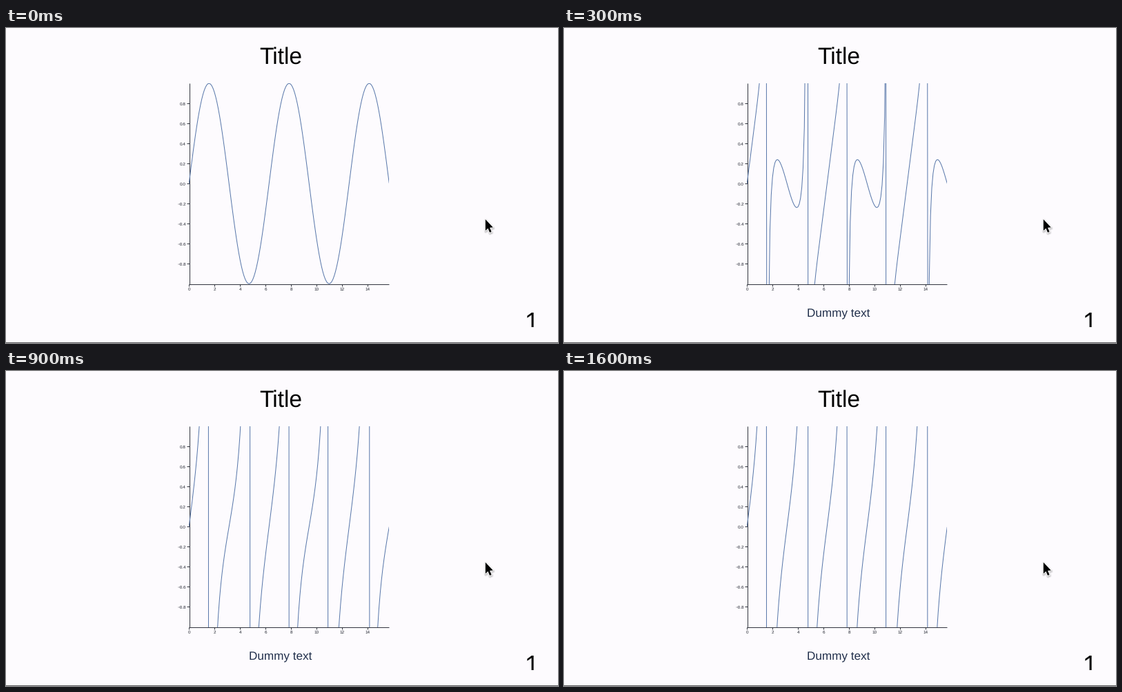
Animation of 800 by 456 pixels, one loop 1.65 s. Source, as a matplotlib script:

```python
import numpy as np
import matplotlib.pyplot as plt
from matplotlib.animation import FuncAnimation
from matplotlib.patches import Polygon, Rectangle

W, H, DPI = 800, 456, 64
FRAMES, STEP = 33, 50            # one loop lasts 1650 ms
MORPH_START, MORPH_TIME = 26, 1000

PX = 72 / DPI                    # points per pixel
LEFT, MIDDLE, SIZE = 265.2, 225.2, 290
X_MAX = 15.7
BACK, AXIS, CURVE = "#fdfbfe", "#33363f", "#5877aa"

plt.rcParams.update({
    "font.family": "Liberation Sans",
    "text.hinting": "none",
    "path.simplify": False,
})

fig = plt.figure(figsize=(W / DPI, H / DPI), dpi=DPI, facecolor=BACK)
ax = fig.add_axes([0, 0, 1, 1])
ax.set_xlim(0, W)
ax.set_ylim(H, 0)
ax.axis("off")


def to_x(x):
    return LEFT + x * SIZE / X_MAX


def to_y(y):
    return MIDDLE - y * SIZE / 2


def label(x, y, text, size, color="black", ha="center"):
    return ax.text(x, y, text, fontsize=size * PX, color=color,
                   ha=ha, va="baseline")


def line(xs, ys, color=AXIS, width=1.0, **kw):
    return ax.plot(xs, ys, color=color, lw=width * PX, **kw)[0]


def shape(points, color, **kw):
    return ax.add_patch(Polygon(points, facecolor=color, **kw))


def draw_axes():
    bottom = MIDDLE + SIZE / 2 + 0.3
    line([265.5, 265.5], [80, bottom], solid_capstyle="butt")
    line([265, 555], [bottom, bottom], solid_capstyle="butt")
    for x in range(0, 15, 2):
        line([to_x(x)] * 2, [bottom, bottom + 3], solid_capstyle="butt")
        label(to_x(x) + 0.2, 379.8, str(x), 6.4, "#20242e")
    for k in range(-4, 5):
        y = to_y(k / 5)
        line([262, 265.5], [y, y], solid_capstyle="butt")
        text = f"{k / 5:.1f}".replace("-", "\u2212")
        label(261, y + 2.5, text, 6.4, "#20242e", "right")


def draw_page():
    label(397.8, 51.5, "Title", 33.5)
    # page number without a foot
    shape([(761.6, 433), (761.6, 415.4), (755.4, 419.7), (755.4, 416.7),
           (761.8, 412), (764.6, 412), (764.6, 433)], "black", lw=0)
    ax.add_patch(Rectangle((0, 455), W, 1, color="#5c5c5e", lw=0))


def draw_cursor():
    arrow = np.array([(694.8, 277), (694.8, 293.4), (698.5, 290),
                      (701, 296), (703.6, 294.9), (701.1, 289),
                      (705.8, 288.6)])
    for width in (5, 3.5, 2):
        shape(arrow + (0.5, 1.5), "black", alpha=0.06, edgecolor="black",
              lw=width * PX, joinstyle="round", zorder=4)
    shape(arrow, "black", edgecolor="white", lw=2 * PX,
          joinstyle="miter", zorder=5)
    shape(arrow, "black", lw=0, zorder=6)


draw_axes()
draw_page()
draw_cursor()
caption = label(397.5, 418, "Dummy text", 17.1, "#22304c")

xs = np.arange(0, 158) / 10
sine, tangent = np.sin(xs), np.tan(xs)
curve = line(to_x(xs), to_y(sine), CURVE, solid_joinstyle="round", zorder=3)
window = Rectangle((265, 80), SIZE, SIZE + 0.5, transform=ax.transData)
curve.set_clip_path(window)


def update(i):
    mix = np.clip((i * STEP - MORPH_START) / MORPH_TIME, 0, 1)
    curve.set_ydata(to_y((1 - mix) * sine + mix * tangent))
    caption.set_visible(i > 0)
    return curve, caption


anim = FuncAnimation(fig, update, frames=FRAMES, interval=STEP,
                     repeat=True, repeat_delay=0)
plt.show()
```
